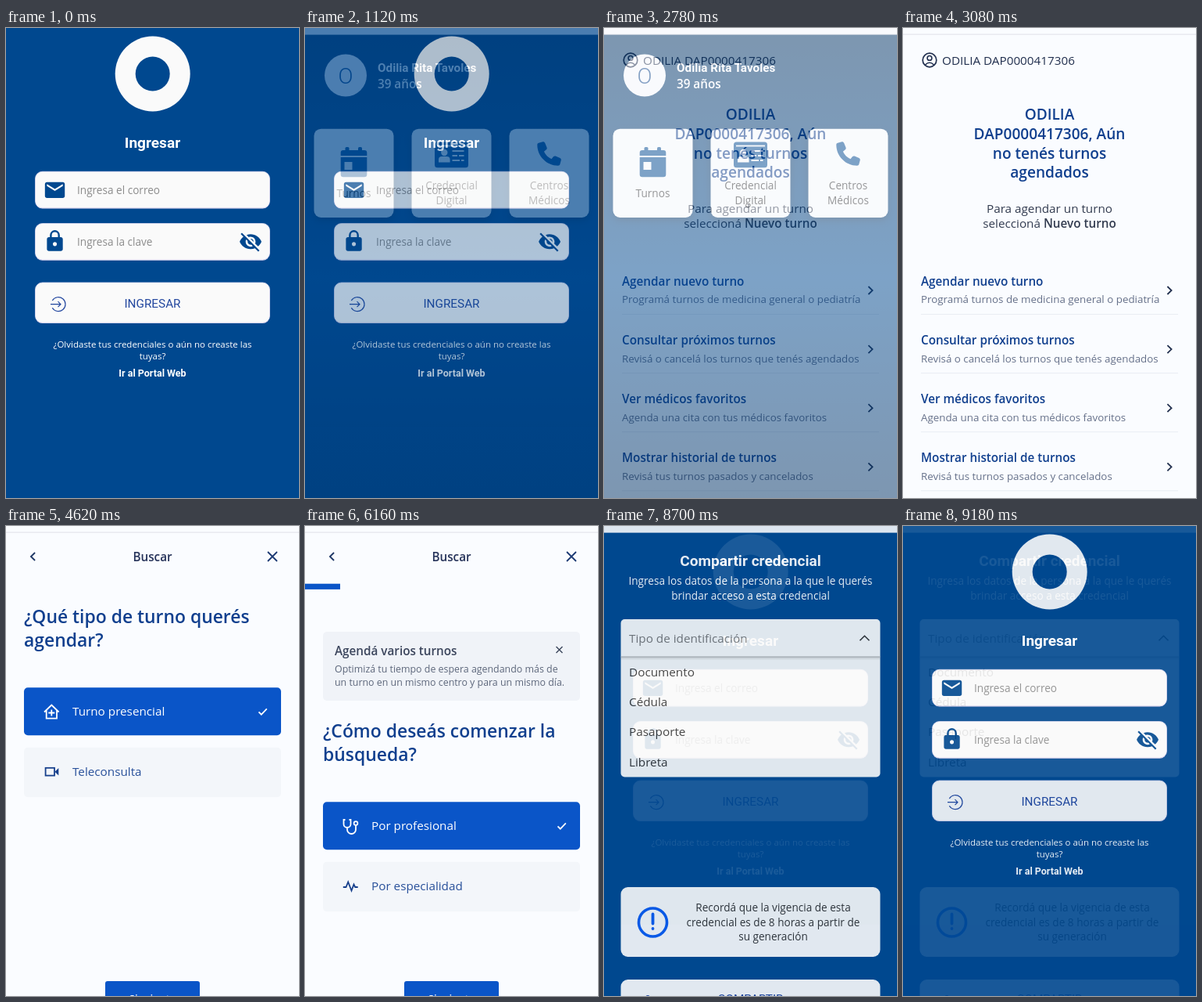
An HTML page for the animation above (9.24 s loop, 375x600 px).

```html
<!DOCTYPE html>
<html lang="es">
<head>
<meta charset="utf-8">
<title>Recorrido de turnos</title>
<style>
html, body { margin: 0; width: 100%; height: 100%; overflow: hidden; background: #00488f; }
svg { display: block; width: 100%; height: 100%; }
text { font-family: "Open Sans", sans-serif; white-space: pre; }
.rb { font-family: Roboto, sans-serif; }
.raised { filter: drop-shadow(0 4px 4px rgba(0, 0, 0, .28)); }
</style>
</head>
<body>
<svg id="stage" viewBox="0 0 375 600" xmlns="http://www.w3.org/2000/svg">
  <defs>
    <linearGradient id="night" x1="0" y1="0" x2="0" y2="1">
      <stop offset="0" stop-color="#003060"/>
      <stop offset=".53" stop-color="#00488f"/>
      <stop offset="1" stop-color="#003062"/>
    </linearGradient>
    <linearGradient id="shade" x1="0" y1="0" x2="0" y2="1">
      <stop offset="0" stop-color="#000" stop-opacity=".14"/>
      <stop offset="1" stop-color="#000" stop-opacity="0"/>
    </linearGradient>
  </defs>
</svg>
<script>
const BLUE = '#00488f', PAPER = '#fafafa', PAGE = '#fafcff', ACTION = '#0a55c8';
const TITLE = '#103f8e', INK = '#22304f', MUTED = '#66718a';
const MID = 187.5;

const rect = (x, y, w, h, fill, r = 0, extra = '') =>
  `<rect x="${x}" y="${y}" width="${w}" height="${h}" rx="${r}" fill="${fill}" ${extra}/>`;
const circle = (x, y, r, fill, extra = '') =>
  `<circle cx="${x}" cy="${y}" r="${r}" fill="${fill}" ${extra}/>`;
const stroke = (d, color, w = 1.8, extra = '') =>
  `<path d="${d}" fill="none" stroke="${color}" stroke-width="${w}" ${extra}/>`;
const shape = (d, fill, x = 0, y = 0, k = 1) =>
  `<path d="${d}" fill="${fill}" fill-rule="evenodd" transform="translate(${x} ${y}) scale(${k})"/>`;
const text = (s, x, y, size, fill, weight = 400, extra = '') =>
  `<text x="${x}" y="${y}" font-size="${size}" fill="${fill}" font-weight="${weight}" ${extra}>${s}</text>`;
const centered = (s, x, y, size, fill, weight = 400, cls = '') =>
  text(s, x, y, size, fill, weight, `text-anchor="middle" class="${cls}"`);
const roboto = (s, y, size, fill, weight) => centered(s, MID, y, size, fill, weight, 'rb');
const each = (list, fn) => list.map(fn).join('');

const MAIL = 'M20 4H4c-1.1 0-2 .9-2 2v12c0 1.1.9 2 2 2h16c1.1 0 2-.9 2-2V6c0-1.1-.9-2-2-2zm0 4l-8 5-8-5V6l8 5 8-5v2z';
const LOCK = 'M18 8h-1V6a5 5 0 0 0-10 0v2H6c-1.1 0-2 .9-2 2v10c0 1.1.9 2 2 2h12c1.1 0 2-.9 2-2V10c0-1.1-.9-2-2-2z' +
  'M12 17a2 2 0 1 1 0-4a2 2 0 0 1 0 4zM15.1 8H8.9V6a3.1 3.1 0 0 1 6.2 0v2z';
const EYE_TOP = 'M12 7c2.76 0 5 2.24 5 5 0 .65-.13 1.26-.36 1.83l2.92 2.92c1.51-1.26 2.7-2.89 3.43-4.75' +
  '-1.73-4.39-6-7.5-11-7.5-1.4 0-2.74.25-3.98.7l2.16 2.16C10.74 7.13 11.35 7 12 7z' +
  'M11.84 9.02l3.15 3.15.02-.16c0-1.66-1.34-3-3-3l-.17.01z';
const EYE_LOW = 'M2 4.27l2.74 2.74C3.08 8.3 1.78 10.02 1 12c1.73 4.39 6 7.5 11 7.5 1.55 0 3.03-.3 4.38-.84' +
  'L19.73 22 21 20.73 3.27 3 2 4.27zM7.53 9.8l1.55 1.55c-.05.21-.08.43-.08.65 0 1.66 1.34 3 3 3 .22 0 .44-.03.65-.08' +
  'l1.55 1.55c-.67.33-1.41.53-2.2.53-2.76 0-5-2.24-5-5 0-.79.2-1.53.53-2.2z';
const PHONE = 'M165 25c-8-19-28-29-47-24l-88 24C12 30 0 46 0 64C0 311 201 512 448 512c18 0 34-12 39-29l24-88' +
  'c5-19-5-40-23-48l-96-40c-16-7-35-2-46 12L305 368C234 335 177 278 144 207L193 167c14-11 18-30 12-46z';

// Shared pieces
const chevron = (x, y, dx, color = INK) => stroke(`M${x - dx} ${y - 5}L${x + dx} ${y}L${x - dx} ${y + 5}`, color);
const cross = (x, y, r, color, w) =>
  stroke(`M${x - r} ${y - r}L${x + r} ${y + r}M${x + r} ${y - r}L${x - r} ${y + r}`, color, w);
const field = (y, h) =>
  rect(37.5, y + .8, 300, h, '#b9b6dc', 9) +
  rect(37.5, y, 300, h, PAPER, 9, 'stroke="#dcdaf2" stroke-width=".8"');
const page = () => rect(0, 0, 375, 600, PAGE) + rect(0, 7.5, 375, 1.3, '#e6e8ed');
const searchHeader = () =>
  chevron(34.5, 39, -2.6, '#1d3564') + centered('Buscar', MID, 45, 15.26, '#26335a', 600) +
  cross(341, 39, 6, '#1d3a74', 1.8);
const heading = (lines, y) => each(lines, (s, i) => text(s, 23, y + i * 30, 22.9, TITLE, 600));
const choices = (y, on, off) =>
  rect(23, y, 329, 61, ACTION, 5) + text(on, 85, y + 36, 15.26, '#fff') +
  stroke(`M323.5 ${y + 31}l3.3 3.4l7-7.4`, '#fff', 1.7) +
  rect(23, y + 76.5, 329, 63.5, '#f3f6fa', 5) + text(off, 85, y + 112.4, 15.26, '#28509a');
const nextButton = () =>
  rect(127, 581, 121, 42, ACTION, 3) + centered('Siguiente', MID, 607.7, 13.35, '#fff', 600);

function login() {
  return rect(0, 0, 375, 600, BLUE) +
    circle(187.7, 58.5, 48, PAPER) + circle(187.7, 58.5, 22, BLUE) +
    roboto('Ingresar', 152.7, 19.08, '#fff', 700) +
    field(183.3, 46.5) + shape(MAIL, BLUE, 47.3, 191.6, 1.27) +
    text('Ingresa el correo', 91, 211.5, 13.6, '#8c8c8c') +
    field(249.5, 46.5) + shape(LOCK, BLUE, 47.3, 256.8, 1.27) +
    text('Ingresa la clave', 91, 277.5, 13.6, '#8c8c8c') +
    shape(EYE_TOP, BLUE, 297.8, 257.6, 1.27) + shape(EYE_LOW, BLUE, 297.8, 257.6, 1.27) +
    field(325, 51.3) + roboto('INGRESAR', 357, 15.3, '#23479f', 400) +
    stroke('M59.3 348A9 9 0 1 1 59.3 357.3M57 352.7H70M66.5 349.2L70 352.7L66.5 356.2', '#23479f', 1.2) +
    centered('¿Olvidaste tus credenciales o aún no creaste las', MID, 407.6, 11.5, '#fff') +
    centered('tuyas?', MID, 423.2, 11.5, '#fff') +
    roboto('Ir al Portal Web', 444.6, 12.5, '#fff', 700);
}

function home() {
  const calendar =
    rect(51.5, 152, 5, 8, BLUE, 1.5) + rect(68, 152, 5, 8, BLUE, 1.5) +
    shape('M49 156H76Q79.3 156 79.3 159.3V163H45.7V159.3Q45.7 156 49 156zM45.7 165H79.3V187Q79.3 190.3 76 190.3H49' +
      'Q45.7 190.3 45.7 187zM50.5 171V181H60.5V171z', BLUE);
  const card =
    rect(166, 145.5, 43, 32.8, BLUE, 3.5) + rect(169, 149.6, 37, 1.8, PAPER) +
    circle(178.3, 159, 4.2, PAPER) +
    shape('M171 171.5V168Q171 164 175 164H181.500Q185.600 164 185.600 168V171.500z', PAPER) +
    stroke('M188.5 157H203.500M188.500 163H195M197 163H203.500M188.500 169H198M200 169H203.500', PAPER, 2);
  return rect(0, 0, 375, 600, 'url(#night)') + rect(0, 0, 375, 8.6, '#f8f9fc') +
    circle(52, 60.5, 27, '#f8f9fc') +
    centered('O', 52, 71, 28, '#0b4288', 300, 'rb') +
    text('Odilia Rita Tavoles', 93, 56.4, 15.26, '#fff', 700, 'class="rb"') +
    text('39 años', 93, 76.6, 15.26, '#fff', 600) +
    each([11.5, 136.5, 261.5], x => rect(x, 128.7, 102, 113.3, '#f9fafc', 9, 'class="raised"')) +
    calendar + card + shape(PHONE, BLUE, 297.3, 145.3, .0596) +
    each([['Turnos', 62.5, 216], ['Credencial', MID, 206], ['Digital', MID, 224.5],
      ['Centros', 312.5, 206], ['Médicos', 312.5, 224.5]],
      ([s, x, y]) => centered(s, x, y, 13.6, '#333', 500));
}

function appointments() {
  const items = [
    ['Agendar nuevo turno', 'Programá turnos de medicina general o pediatría'],
    ['Consultar próximos turnos', 'Revisá o cancelá los turnos que tenés agendados'],
    ['Ver médicos favoritos', 'Agenda una cita con tus médicos favoritos'],
    ['Mostrar historial de turnos', 'Revisá tus turnos pasados y cancelados']
  ];
  return page() +
    circle(34, 41, 8.8, 'none', `stroke="${INK}" stroke-width="1.7"`) +
    circle(34, 38.4, 2.9, 'none', `stroke="${INK}" stroke-width="1.6"`) +
    stroke('M28.500 47Q34 41.500 39.500 47', INK, 1.6) +
    text('ODILIA DAP0000417306', 50, 46.8, 15.26, INK) +
    each(['ODILIA', 'DAP0000417306, Aún', 'no tenés turnos', 'agendados'],
      (s, i) => centered(s, MID, 116.7 + i * 24.9, 19.08, TITLE, 600)) +
    centered('Para agendar un turno', MID, 235.6, 15.26, '#333c50') +
    centered('seleccioná <tspan font-weight="600">Nuevo turno</tspan>', MID, 254.8, 15.26, '#333c50') +
    each(items, ([name, note], i) => {
      const y = 329 + i * 75.1;
      return text(name, 23, y, 15.26, TITLE, 600) + text(note, 23, y + 22.4, 13.35, MUTED) +
        chevron(341, y + 6, 2.6) + rect(23, y + 36, 329, 1, '#e9edf3');
    });
}

function visitType() {
  return page() + searchHeader() +
    heading(['¿Qué tipo de turno querés', 'agendar?'], 124) +
    choices(206.3, 'Turno presencial', 'Teleconsulta') +
    stroke('M49 237.500L58.300 228.500L67.600 237.500M51.700 235.500V245.700H65V235.500M58.300 234.500V242.500M54.300 238.500H62.300', '#fff') +
    rect(50.6, 308.8, 11.4, 9.8, 'none', 0, 'stroke="#17408c" stroke-width="1.8"') +
    shape('M62.500 313.700L67.300 309V318.400z', '#17408c') +
    nextButton();
}

function searchMode() {
  return page() + searchHeader() +
    rect(0, 73.7, 45, 7.2, ACTION) +
    rect(23, 135, 329, 88, '#f0f3f8', 5) +
    text('Agendá varios turnos', 38, 165.4, 15.26, '#3b455c', 600) +
    cross(325.5, 158, 4, '#3b455c', 1.4) +
    text('Optimizá tu tiempo de espera agendando más de', 38, 186.6, 12.4, '#5d677b') +
    text('un turno en un mismo centro y para un mismo día.', 38, 204, 12.4, '#5d677b') +
    heading(['¿Cómo deseás comenzar la', 'búsqueda?'], 270) +
    choices(352.3, 'Por profesional', 'Por especialidad') +
    stroke('M51.500 375H49.500V380.500a4.500 4.500 0 0 0 9 0V375H56.500M54 385V387.500a5.500 5.500 0 0 0 11 0V382', '#fff') +
    circle(65, 379.5, 2.4, 'none', 'stroke="#fff" stroke-width="1.7"') +
    stroke('M48.800 461H52.500L55.200 454.500L59.500 465.500L62.500 457.500L64.200 461H67.700', '#17408c') +
    nextButton();
}

function share() {
  const info = ['Recordá que la vigencia de esta', 'credencial es de 8 horas a partir de', 'su generación'];
  return rect(0, 0, 375, 600, BLUE) + rect(0, 0, 375, 8.6, '#f8f9fc') +
    roboto('Compartir credencial', 50.5, 19.08, '#fff', 700) +
    centered('Ingresa los datos de la persona a la que le querés', MID, 75.3, 13.6, '#fff') +
    centered('brindar acceso a esta credencial', MID, 93.6, 13.6, '#fff') +
    rect(21.5, 119, 332, 201.500, PAPER, 5) +
    rect(21.5, 166.5, 332, 1, '#aaa') + rect(21.5, 167.5, 332, 4, 'url(#shade)') +
    text('Tipo de identificación', 32, 149, 15.26, '#777') +
    stroke('M327.500 146.300L333.500 140.300L339.500 146.300', '#333', 1.6) +
    each(['Documento', 'Cédula', 'Pasaporte', 'Libreta'],
      (s, i) => text(s, 32, 192.2 + i * 38.1, 15.3, '#333')) +
    rect(21.5, 461, 332, 89, PAPER, 9) +
    circle(62.5, 506, 18, 'none', 'stroke="#0b5cf0" stroke-width="3.6"') +
    stroke('M62.500 495.500V507.500M62.500 514V514.100', '#0b5cf0', 3.8, 'stroke-linecap="round"') +
    each(info, (s, i) => centered(s, 216.5, 492.2 + i * 18.4, 13.6, '#333')) +
    rect(21.5, 579, 332, 51, PAPER, 9) +
    circle(56, 601.5, 2.6, '#23479f') +
    roboto('COMPARTIR', 609.3, 15.3, '#23479f', 400);
}

const HOLD = 1000, STEP = 60, SPAN = 1540;
const stage = document.getElementById('stage');
const scenes = [login, home, appointments, visitType, searchMode, share].map(draw => {
  const g = document.createElementNS('http://www.w3.org/2000/svg', 'g');
  g.innerHTML = draw();
  return g;
});

let shown = '';
function render(ms) {
  const t = ms % (SPAN * scenes.length);
  const i = Math.floor(t / SPAN), into = t - i * SPAN - HOLD;
  const mix = into < 0 ? 0 : Math.min(9, Math.floor(into / STEP) + 1) / 10;
  const key = i + ':' + mix;
  if (key === shown) return;
  shown = key;
  const base = scenes[i], over = scenes[(i + 1) % scenes.length];
  scenes.forEach(g => { if (g !== base && g !== over) g.remove(); });
  base.setAttribute('opacity', 1);
  over.setAttribute('opacity', mix);
  stage.append(base, over);
}

const start = performance.now();
function tick() {
  render(performance.now() - start);
  requestAnimationFrame(tick);
}
tick();
</script>
</body>
</html>
```
